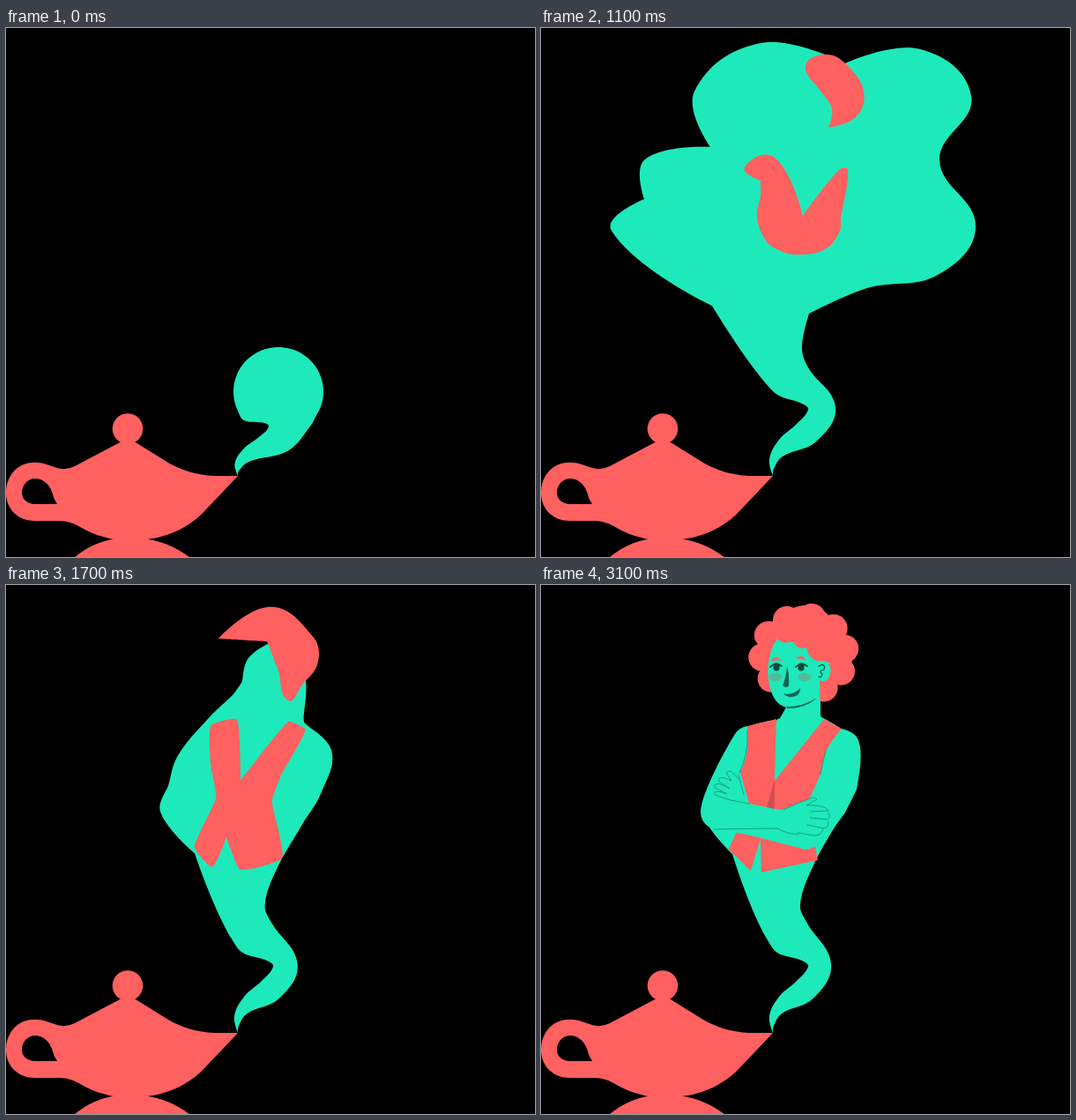
Animation, 600 px wide and 600 px high, one loop 3600 ms. Source, as an HTML page:

```html
<!DOCTYPE html>
<html lang="en">
<head>
<meta charset="utf-8">
<title>Genie</title>
<style>
  html, body { margin: 0; height: 100%; overflow: hidden; background: #000; }
  svg { display: block; width: 100vw; height: 100vh; }
  .red { fill: #ff6060; }
  .teal { fill: #1ee9ba; }
  .dark { fill: #116454; }
  .line { fill: none; stroke: #128e75; stroke-width: .8; stroke-linecap: round; stroke-linejoin: round; }
  .lash { fill: none; stroke: #104b3e; stroke-width: 1.7; stroke-linecap: round; }
</style>
</head>
<body>
<svg viewBox="0 0 600 600">
  <rect width="600" height="600"/>

  <g class="red">
    <circle cx="138" cy="454.5" r="17.3"/>
    <path fill-rule="evenodd" d="M131 469L78 497Q68 502 58 499L46 495C38 492 28 492 20 495C8 500 0 512 0 527C0 546 14 559 33 559H60C70 559 78 562 86 567C98 574 112 578 122 580H160C185 577 210 565 226 547L263 508H236C215 507 198 501 184 493L147 470Q138 466 131 469Z
      M33 511C24 511 18 519 18 527C18 535 25 540 33 540H58Q54 534 52 526C49 517 41 511 33 511Z"/>
    <path d="M77 601Q98 583 124 579.5H158Q186 583 209 601Z"/>
  </g>

  <path id="smoke" class="teal"/>
  <path id="hair" class="red"/>
  <path id="vest" class="red"/>

  <g id="genie">
    <g id="curls" class="red"><ellipse cx="298" cy="79" rx="48" ry="45"/></g>
    <g class="teal">
      <path d="M268 61C258 74 256 95 258 108C261 127 268 137 279 139V150L268 152L266 221L321 152L317 149L316 109L328 88L313 86Q304 84 301 71Q290 74 286 64Q275 68 268 61Z"/>
      <ellipse cx="320" cy="97.5" rx="8.6" ry="11.5"/>
      <path d="M234 160Q224 162 220 169C207 190 187 228 182 250Q178 266 190 274Q196 278 206 278L238 284L300 300Q313 298 323 288L345 258L358 232C363 205 366 180 356 170Q350 165 341 163C322 185 320 195 317 215Q312 238 303 243L272 255L236 248L225 214C235 195 235 185 234 160Z"/>
    </g>
    <path fill="#d24e50" d="M265 221L256 252L265 254Z"/>
    <path class="line" d="M196 277L268 276Q280 283 292 283M234 165Q236 190 225 213M323 187L317 215
      M275 255Q292 247 303 243Q311 239 313 243L301 250Q322 249 326 256L306 257M326 258Q329 264 325 266L305 264M326 268Q327 275 320 276L302 272M320 277Q318 285 308 284L291 281
      M224 220Q214 207 210 213L216 222Q202 215 201 222L214 231Q198 221 196 229L211 237Q195 231 197 238L215 244L236 248M224 215L230 238"/>

    <g fill="#4fbe98">
      <ellipse cx="266" cy="104.5" rx="7.5" ry="5"/>
      <ellipse cx="299" cy="104.5" rx="7.5" ry="5"/>
    </g>
    <path class="red" d="M261 87Q264 78 274 86Q267 84 261 87ZM288 84Q297 76 300 86Q294 82 288 84Z"/>
    <path class="dark" d="M279 92Q278 105 274 114Q279 118 281 114Q282 103 279 92ZM275 123Q285 126 294 117Q294 127 283 127Q277 126 275 123ZM279 138Q297 138 313 128Q300 140 279 140Z"/>
    <path class="lash" style="stroke-width:1.2" d="M315 92Q323 88 321 96Q314 97 319 101Q318 106 315 104"/>
    <path id="closed" class="lash" d="M260 94Q266 91 273 95M290 94Q295 91 302 95"/>
    <g id="open">
      <path class="lash" d="M260 93Q266 86 273 92M289 93Q295 86 302 92"/>
      <ellipse class="pupil" cx="267" cy="93" rx="3.7" ry="4.5" fill="#104b3e"/>
      <ellipse class="pupil" cx="295" cy="93" rx="3.7" ry="4.5" fill="#104b3e"/>
    </g>
  </g>
</svg>
<script>
const el = id => document.getElementById(id);
const ramp = (t, from, to) => Math.min(1, Math.max(0, (t - from) / (to - from)));
const polar = (cx, cy, rx, ry, degrees) => {
  const a = degrees * Math.PI / 180;
  return [cx + rx * Math.cos(a), cy + ry * Math.sin(a)];
};

// A key point is [x, y, roundness]; "!" marks a corner.
const keys = text => text.split(' ').map(p => [...p.split(',').map(parseFloat), p.endsWith('!') ? 0 : 1]);
const pose = (time, text) => ({ time, points: keys(text) });

// The stem rises from the spout; every smoke body sits on a scaled copy of it.
const spout = [263, 508];
const stemLeft = keys('263,508! 259,489 270,467 290,449 303,433 298,427');
const stemRight = keys('334,430 312,469 274,486 264,500');
const scaleStem = (points, sx, sy) =>
  points.map(([x, y, r]) => [spout[0] + (x - spout[0]) * sx, spout[1] + (y - spout[1]) * sy, r]);
const smokePose = (time, body, spread = 1, lift = 1) => ({
  time,
  points: [...scaleStem(stemLeft, (1 + lift) / 2, lift), ...body, ...scaleStem(stemRight, spread, lift)]
});

const ball = Array.from({ length: 18 }, (_, i) => [...polar(309, 412.5, 51, 50.5, 140 + 15 * i), 1]);
const smoke = [
  smokePose(0, ball, 1.17, 0.74),
  smokePose(400, keys('252,403 215,325 220,285 230,245 244,200 262,170 290,153 318,148 340,153 358,170 367,195 362,221 340,252 322,287 311,308 303,324 292,348 295,360'), 1.155),
  smokePose(800, keys('262,412 183,298 131,250 167,215 150,180 236,145 217,55 245,28 303,46 385,68 445,90 398,163 455,218 400,271 338,286 303,326 296,362 303,385')),
  smokePose(1100, keys('262,411 194,315! 80,230 117,194! 118,149 192,135! 174,72 250,17 345,40! 430,24 488,77 452,150 493,225 450,280 370,295 304,324! 296,362 303,385')),
  smokePose(1500, keys('262,411 208,303! 158,250 173,210! 172,172 236,120 230,70 245,55 300,45 352,63! 387,95 382,168 394,205 358,258 325,297 301,335 293,365 301,384')),
  smokePose(1800, keys('262,411 217,305! 184,262 190,235 206,205 228,165 270,153! 279,137! 264,100 290,66 314,100 316,149! 357,180 357,225 342,258 309,318 294,362 301,382'), 0.93)
];
const hair = [
  pose(1100, '300,43 322,30 345,40 366,72 357,101 326,113! 330,92 316,70'),
  pose(1500, '238,58! 298,28 347,52 357,85 340,110 320,132 306,100 296,60!'),
  pose(1800, '242,62! 300,23 349,62 352,90 333,116 320,130 310,95 296,66!')
];
const vest = [
  pose(1100, '231,158 265,147 297,213! 338,161 348,161 340,217 339,230 322,251 289,257 270,252 255,241 245,214 249,190 249,173!'),
  pose(1500, '229,158 252,154 268,224! 318,162 337,167 303,215 301,240 312,304 298,317 252,281! 226,311 215,290 243,228 244,185'),
  pose(1800, '234,160! 267,152! 265,221! 321,152! 341,163! 317,215! 302,248! 314,312! 250,326! 249,288! 238,324! 213,300! 236,248! 226,212!')
];

function morph(poses, t) {
  const i = poses.findIndex(p => p.time >= t);
  const next = i < 0 ? poses.length - 1 : Math.max(1, i);
  const a = poses[next - 1], b = poses[next];
  const mix = ramp(t, a.time, b.time);
  return a.points.map((p, n) => p.map((v, k) => v + (b.points[n][k] - v) * mix));
}

// Closed curve; each tangent follows the neighbours, each handle its segment's length.
function outline(points) {
  const n = points.length, at = i => points[(i + n) % n];
  const distance = (a, b) => Math.hypot(b[0] - a[0], b[1] - a[1]) || 1;
  const handle = (i, side) => {
    const [x, y, roundness] = at(i), before = at(i - 1), after = at(i + 1);
    const reach = side * 0.37 * roundness * distance(at(i), at(i + side)) / distance(before, after);
    return [x + (after[0] - before[0]) * reach, y + (after[1] - before[1]) * reach];
  };
  return 'M' + at(0).slice(0, 2) + points.map((_, i) =>
    'C' + [handle(i, 1), handle(i + 1, -1), at(i + 1).slice(0, 2)].join(' ')).join('') + 'Z';
}

function grow(id, size, x, y) {
  el(id).setAttribute('transform', `translate(${x} ${y}) scale(${size}) translate(${-x} ${-y})`);
}

function eyeOpening(t) {
  if (t < 2400 || t === 3000) return 0;
  return t === 2400 || t === 2900 ? 0.5 : 1;
}

const show = (id, visible) => el(id).setAttribute('display', visible ? 'inline' : 'none');

for (let i = 0; i < 9; i++) {
  const [x, y] = polar(298, 79, 47, 43, 141 + 35 * i);
  el('curls').insertAdjacentHTML('beforeend', `<circle cx="${x}" cy="${y}" r="15.8"/>`);
}

function draw() {
  const t = Math.floor(performance.now() % 3600 / 100) * 100;
  for (const [id, poses] of Object.entries({ smoke, hair, vest })) {
    el(id).setAttribute('d', outline(morph(poses, t)));
  }
  const size = ramp(t, 800, 1100);
  grow('hair', size, 335, 72);
  grow('vest', size, 295, 215);

  const opening = eyeOpening(t);
  show('genie', t >= 1800);
  show('open', opening > 0);
  show('closed', opening === 0);
  document.querySelectorAll('.pupil').forEach(p => p.setAttribute('ry', 4.5 * opening));
  requestAnimationFrame(draw);
}
draw();
</script>
</body>
</html>
```
